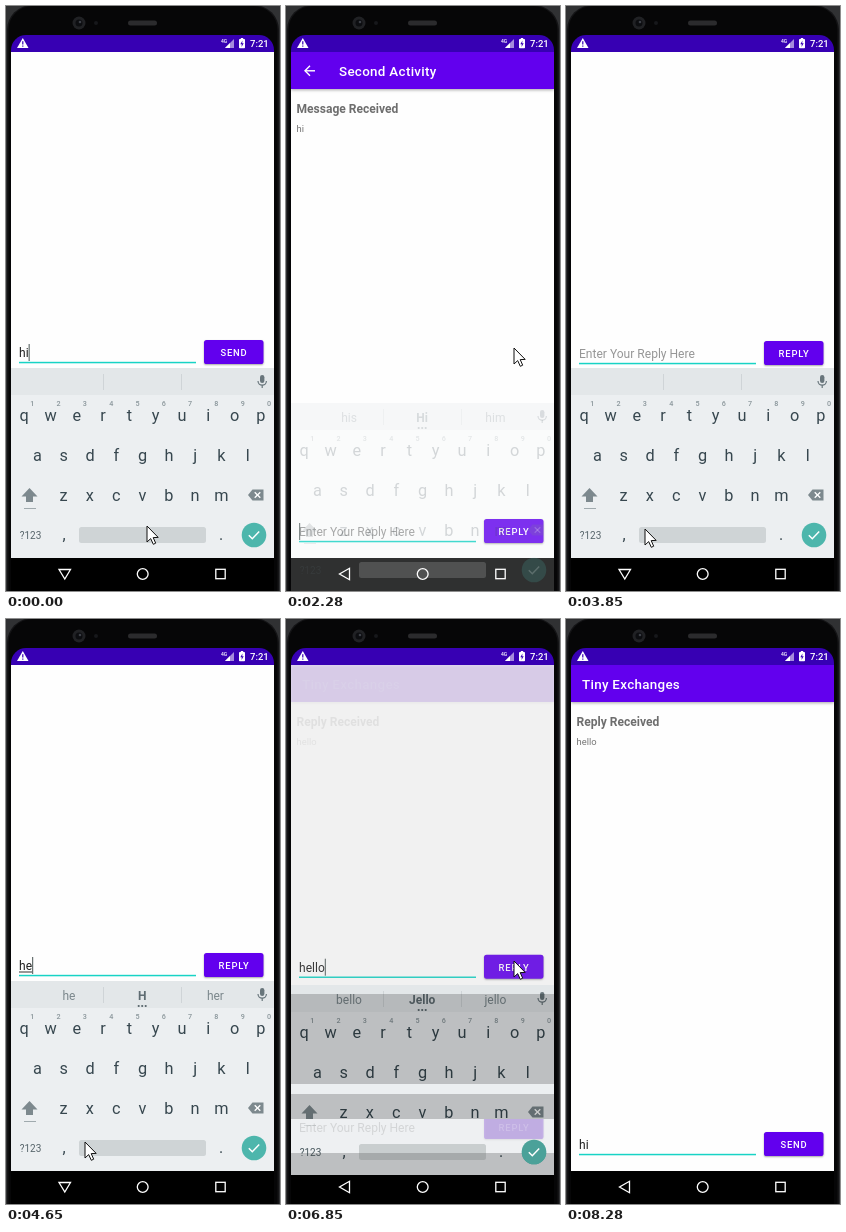
Recreate the animation shown at these times as an HTML page with a canvas. Size 274 by 585 pixels, loop 8380 ms.

```html
<!DOCTYPE html>
<html lang="en">
<head>
<meta charset="utf-8">
<title>Message exchange</title>
<style>
html, body { margin: 0; width: 100%; height: 100%; overflow: hidden; background: #000; }
canvas { display: block; width: 274px; height: 585px; }
</style>
</head>
<body>
<canvas id="stage"></canvas>
<script>
const W = 274, H = 585, LOOP = 8380, PAN = 179;
const FONT = 'Roboto, sans-serif';
const PURPLE = '#6200ee', DARK_PURPLE = '#3700b3', TEAL = '#18d3c5', KEY = '#37474f';
const canvas = document.getElementById('stage');
const ctx = canvas.getContext('2d');
const ratio = window.devicePixelRatio || 1;
canvas.width = W * ratio;
canvas.height = H * ratio;

// Bursts of screen updates: first time, last time, number of updates.
const BURSTS = [
  [0, 0, 1], [120, 240, 2], [640, 760, 2], [1040, 1310, 3], [1590, 2560, 8],
  [2700, 3710, 8], [3850, 4650, 7], [4900, 5260, 4], [5790, 6700, 7],
  [6850, 7240, 4], [7690, 7820, 2], [8280, 8280, 1]
];
const updates = BURSTS.flatMap(([from, to, n]) => Array.from({ length: n }, (_, i) =>
  Math.floor((from + (n > 1 ? (to - from) * i / (n - 1) : 0)) / 10) * 10));

const POINTER = [
  [500, 141, 520], [640, 172, 440], [760, 211, 341], [1040, 240, 327], [1170, 234, 337],
  [1310, 228, 342], [2560, 228, 342], [2700, 200, 385], [2840, 150, 450], [2980, 100, 510],
  [3130, 79, 523], [5650, 79, 523], [5790, 201, 355], [5940, 240, 312], [6090, 258, 297],
  [6240, 244, 322], [6390, 228, 342]
];

const within = (t, a, b) => t >= a && t < b;

// Linear interpolation along [time, value, ...] stops.
function tween(t, stops, column = 1) {
  const next = stops.findIndex(s => s[0] > t);
  if (next === 0) return stops[0][column];
  if (next < 0) return stops[stops.length - 1][column];
  const a = stops[next - 1], b = stops[next];
  return a[column] + (b[column] - a[column]) * (t - a[0]) / (b[0] - a[0]);
}

function rect(x, y, w, h, color) {
  ctx.fillStyle = color;
  ctx.fillRect(x, y, w, h);
}

function pill(x, y, w, h, r, color) {
  ctx.fillStyle = color;
  ctx.beginPath();
  ctx.roundRect(x, y, w, h, r);
  ctx.fill();
}

function disc(x, y, r, color) {
  ctx.fillStyle = color;
  ctx.beginPath();
  ctx.arc(x, y, r, 0, Math.PI * 2);
  ctx.fill();
}

function path(points, { fill, stroke, width = 1, close = true }) {
  ctx.beginPath();
  points.forEach(([x, y]) => ctx.lineTo(x, y));
  if (close) ctx.closePath();
  if (fill) { ctx.fillStyle = fill; ctx.fill(); }
  if (stroke) { ctx.strokeStyle = stroke; ctx.lineWidth = width; ctx.stroke(); }
}

function text(str, x, y, size, color, { weight = 400, align = 'left', spacing = 0 } = {}) {
  ctx.font = `${weight} ${size}px ${FONT}`;
  ctx.textAlign = align;
  ctx.letterSpacing = spacing + 'px';
  ctx.fillStyle = color;
  ctx.fillText(str, x, y);
  const width = ctx.measureText(str).width;
  ctx.letterSpacing = '0px';
  return width;
}

// Runs a drawing inside its own transform, opacity and clip.
function layer({ dy = 0, alpha = 1, clip }, draw) {
  ctx.save();
  if (clip) {
    ctx.beginPath();
    ctx.rect(...clip);
    ctx.clip();
  }
  ctx.globalAlpha *= alpha;
  ctx.translate(0, dy);
  draw();
  ctx.restore();
}

function drawPhone() {
  rect(0, 0, W, H, '#303133');
  pill(1, -1, W - 2, H + 40, 25, '#141416');
  pill(2.5, 0, W - 5, H + 40, 24, '#060607');
  pill(122, 14.5, 29, 5, 2.5, '#2b2b2d');
  disc(73, 17, 6.5, '#202124');
  disc(73, 17, 3.5, '#0c0d10');
  disc(74, 16, 1.3, '#3c3f46');
  disc(90, 17, 2, '#17181b');
}

function drawStatusBar() {
  pill(5, 29, 263, 17, [15, 15, 0, 0], DARK_PURPLE);
  path([[16.8, 32], [22.5, 42], [11, 42]], { fill: '#fff' });
  rect(16.2, 35.2, 1.2, 3.3, DARK_PURPLE);
  rect(16.2, 39.5, 1.2, 1.2, DARK_PURPLE);
  text('4G', 215, 37, 5, '#fff', { weight: 500 });
  path([[228, 33], [228, 42], [219, 42]], { fill: '#a58bdc' });
  path([[224, 37], [224, 42], [219, 42]], { fill: '#fff' });
  pill(233, 33, 6, 9.3, 0.8, '#fff');
  rect(234.8, 32, 2.4, 1.2, '#fff');
  path([[236.5, 34.5], [234.3, 38.3], [235.8, 38.3], [235.5, 41], [237.7, 37.2], [236.2, 37.2]],
    { fill: DARK_PURPLE });
  text('7:21', 244, 41.2, 9.5, '#fff', { weight: 500 });
}

function shadowed(blur, offset, draw) {
  ctx.save();
  ctx.shadowColor = 'rgba(0,0,0,.35)';
  ctx.shadowBlur = blur * ratio;
  ctx.shadowOffsetY = offset * ratio;
  draw();
  ctx.restore();
}

function drawActivity(page) {
  rect(5, 46, 263, 690, '#fefefe');
  shadowed(3, 1, () => rect(5, 46, 263, 37, PURPLE));
  if (page.back) {
    path([[29, 64.8], [19, 64.8]], { stroke: '#fff', width: 1.4, close: false });
    path([[24, 59.8], [19, 64.8], [24, 69.8]], { stroke: '#fff', width: 1.4, close: false });
  }
  text(page.title, page.back ? 53 : 16, 69.7, 13.4, '#fff', { weight: 500, spacing: 0.3 });
  if (page.heading) {
    text(page.heading, 10.5, 107, 12.06, '#6e6e6e', { weight: 700 });
    text(page.body, 10.5, 126, 9.4, '#757575');
  }

  const typed = page.input;
  const width = text(typed || page.hint, 13, 530, 12.06, typed ? '#212121' : '#969696');
  if (typed && page.composing) rect(13, 531.5, width, 1, '#333');
  if (page.caret) rect(13 + (typed ? width : 0), 517, 1.2, 17, '#66706f');
  rect(13, 534.8, 177, 1.5, TEAL);
  drawButton(page.button);
}

function drawButton(label) {
  shadowed(2, 1, () => pill(198, 513, 59.5, 24, 2.6, PURPLE));
  text(label, 228, 528.8, 9.4, '#fff', { weight: 500, align: 'center', spacing: 0.84 });
}

function drawKeyRow(letters, x, y) {
  [...letters].forEach((ch, i) =>
    text(ch, x + i * 26.3, y + 5.5, 16.3, KEY, { align: 'center' }));
}

function drawKeyboard(words) {
  rect(5, 362, 263, 190, '#eceff1');
  rect(5, 362, 263, 27, '#e3e7e9');
  rect(97, 368, 1, 16, '#cfd4d7');
  rect(175, 368, 1, 16, '#cfd4d7');
  words.forEach((word, i) => text(word, 63 + i * 73.2, 381, 12, i === 1 ? '#5f6c72' : '#7b878c',
    { weight: i === 1 ? 700 : 400, align: 'center' }));
  if (words.length) [132.7, 136.2, 139.7].forEach(x => disc(x, 387, 1.1, '#56646a'));

  pill(254, 369, 4.4, 8, 2.2, '#68757b');
  ctx.strokeStyle = '#68757b';
  ctx.lineWidth = 1.2;
  ctx.beginPath();
  ctx.arc(256.2, 375, 4.2, 0, Math.PI);
  ctx.stroke();
  rect(255.6, 379, 1.2, 3, '#68757b');

  drawKeyRow('qwertyuiop', 18.2, 409);
  drawKeyRow('asdfghjkl', 31.4, 449);
  drawKeyRow('zxcvbnm', 57.6, 489);
  [...'1234567890'].forEach((n, i) =>
    text(n, 26.3 + i * 26.3, 400, 7.2, '#8a969b', { align: 'center', weight: 500 }));

  path([[23.5, 482], [31.5, 490.5], [27, 490.5], [27, 496], [20, 496], [20, 490.5], [15.5, 490.5]],
    { fill: '#7d898e' });
  rect(18, 502, 12, 1, '#a0aaae');
  path([[242, 489], [246.5, 483.5], [257.5, 483.5], [257.5, 494.5], [246.5, 494.5]], { fill: '#7d898e' });
  path([[248.7, 486.2], [254.3, 491.8]], { stroke: '#fff', width: 1.3, close: false });
  path([[254.3, 486.2], [248.7, 491.8]], { stroke: '#fff', width: 1.3, close: false });

  text('?123', 24.5, 533, 10, '#56646a', { align: 'center' });
  text(',', 58, 533.5, 16, KEY, { align: 'center' });
  text('.', 215, 533.5, 16, KEY, { align: 'center' });
  pill(73, 521, 127, 16, 2.5, '#cfd4d6');
  disc(248, 529, 12.3, '#4db6ac');
  path([[242.8, 529.2], [246.3, 532.7], [253.2, 525.5]], { stroke: '#fff', width: 1.5, close: false });
}

function drawNav(keyboardOpen) {
  const line = { stroke: '#fff', width: 1.3 };
  path(keyboardOpen
    ? [[53, 563.5], [64.5, 563.5], [58.8, 573]]
    : [[63.5, 562.3], [63.5, 573.7], [53.5, 568]], line);
  ctx.beginPath();
  ctx.arc(136.7, 568, 5.4, 0, Math.PI * 2);
  ctx.stroke();
  ctx.strokeRect(209.8, 563.3, 9.4, 9.4);
}

function drawPointer(x, y) {
  const outline = [[0, 0], [0, 16], [3.7, 12.6], [6.3, 18.3], [8.7, 17.2], [6.2, 11.6], [11.2, 11.4]];
  path(outline.map(([px, py]) => [x + px, y + py]), { fill: '#fff', stroke: '#111', width: 1 });
}

function suggestions(t) {
  if (t < 240) return [];
  if (t < 3270) return ['his', 'Hi', 'him'];
  if (t < 4510) return [];
  if (t < 4900) return ['he', 'H', 'her'];
  if (t < 5260) return ['help', 'Hell', 'hello'];
  return ['bello', 'Jello', 'jello'];
}

function keyboardState(t) {
  const stops = [
    [2000, 0, 1], [2140, 12, 0.6], [2280, 35, 0.2], [2420, 45, 0],
    [3270, 40, 0], [3420, 28, 0.35], [3560, 12, 0.75], [3710, 3, 1], [3850, 0, 1],
    [6700, 0, 1], [6850, 4, 1], [6980, 18, 0.55], [7110, 35, 0.18], [7240, 45, 0]
  ];
  return { dy: tween(t, stops), alpha: tween(t, stops, 2) };
}

function senderPage(t) {
  const returned = t > 6000;
  return {
    title: 'Tiny Exchanges', button: 'SEND', input: 'hi', hint: '',
    heading: returned && 'Reply Received', body: 'hello',
    composing: within(t, 120, 6000),
    caret: t < 640 || within(t, 1040, 1590) || within(t, 7820, 8280)
  };
}

function replyPage(t) {
  const typedCount = [4380, 4650, 4900, 5020, 5140].filter(at => t >= at).length;
  return {
    title: 'Second Activity', back: true, button: 'REPLY',
    heading: 'Message Received', body: 'hi',
    input: 'hello'.slice(0, typedCount), hint: 'Enter Your Reply Here',
    composing: t < 6700,
    caret: within(t, 2140, 2700) || within(t, 3130, 3560) || within(t, 4380, 5790) || t >= 6240
  };
}

function drawClosingDim(t) {
  const area = [5, 500, 263, 34];
  layer({ clip: area }, () => {
    rect(...area, 'rgba(240,242,243,.65)');
    layer({ dy: -17, alpha: 0.22 }, () => {
      text('Enter Your Reply Here', 13, 530, 12.06, '#777');
      drawButton('REPLY');
    });
  });
  [[375, 90], [475, 25], [534, 22]].forEach(([y, h]) => rect(5, y, 263, h, 'rgba(0,0,0,.2)'));
  layer({ dy: 4, clip: area }, () => {
    text('?123', 24.5, 533, 10, '#56646a', { align: 'center' });
    pill(73, 521, 127, 16, 2.5, 'rgba(190,195,197,.7)');
  });
  layer({ dy: 4 }, () => {
    disc(248, 529, 12.3, '#4ba199');
    path([[242.8, 529.2], [246.3, 532.7], [253.2, 525.5]], { stroke: '#fff', width: 1.5, close: false });
  });
}

function drawPages(t) {
  const content = [5, 46, 263, 506];
  const openAlpha = tween(t, [[1720, 0], [1860, 0.2], [2000, 0.75], [2140, 1]]);
  const openShift = tween(t, [[1860, 30], [2000, 8], [2140, 0]]);
  const replyPan = tween(t, [[3270, 0], [3420, 45], [3560, 120], [3710, 170],
    [3850, 178], [3980, PAN], [6700, PAN], [6850, 177.3], [6980, 177]]);
  const backAlpha = tween(t, [[6700, 0], [6850, 0.12], [6980, 0.6], [7110, 1]]);

  if (openAlpha < 1) {
    layer({ dy: -PAN, clip: content }, () => drawActivity(senderPage(t)));
  }
  if (openAlpha > 0 && backAlpha < 1) {
    layer({ dy: openShift - replyPan, alpha: openAlpha, clip: content },
      () => drawActivity(replyPage(t)));
  }
  if (backAlpha > 0) {
    layer({ alpha: backAlpha, clip: content }, () => drawActivity(senderPage(t)));
    if (backAlpha < 1) rect(...content, 'rgba(0,0,0,.05)');
  }
}

function render(t) {
  ctx.setTransform(ratio, 0, 0, ratio, 0, 0);
  drawPhone();
  drawPages(t);
  drawStatusBar();
  rect(5, 552, 263, 33, '#000');

  const keyboard = keyboardState(t);
  if (keyboard.alpha > 0) {
    layer({ ...keyboard, clip: [5, 46, 263, 539] }, () => drawKeyboard(suggestions(t)));
  }
  if (within(t, 6850, 6980)) drawClosingDim(t);
  drawNav(t < 2140 || within(t, 3420, 6850));
  if (t < 7690) drawPointer(tween(t, POINTER), tween(t, POINTER, 2));
}

let shown = -1;
function tick() {
  const now = performance.now() % LOOP;
  const t = updates.filter(at => at <= now).pop();
  if (t !== shown) render(shown = t);
  requestAnimationFrame(tick);
}
tick();
</script>
</body>
</html>
```
